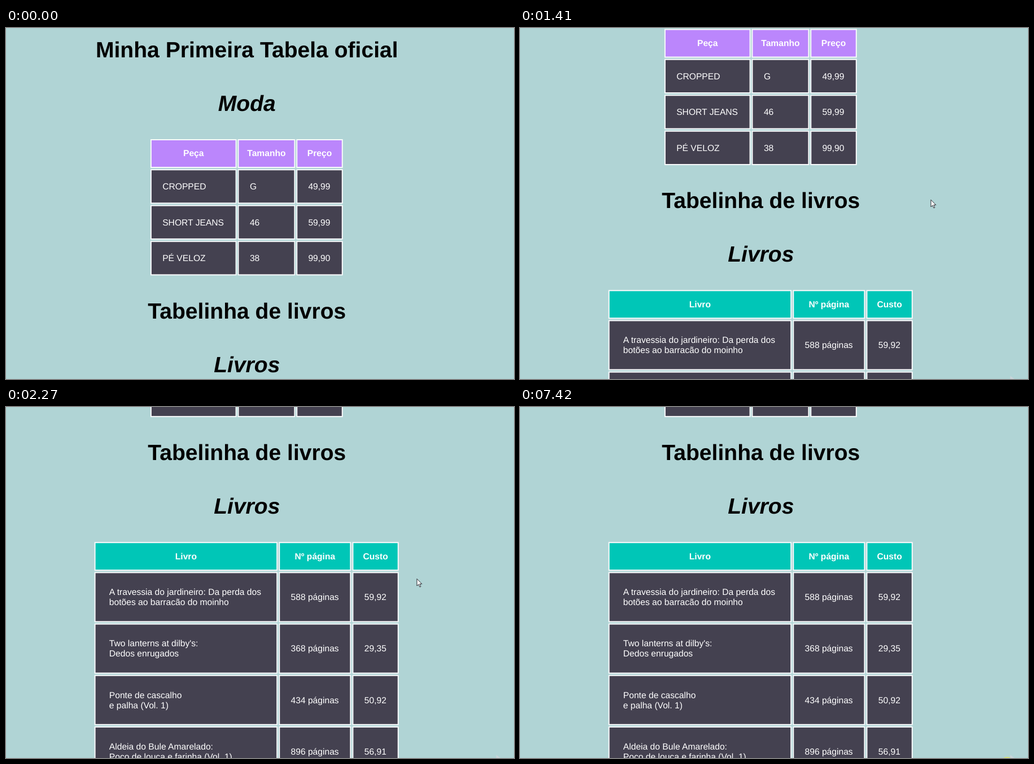
Recreate the animation shown at these times as an HTML page. Size 900x622 px, loop 7540 ms.

```html
<!DOCTYPE html>
<html lang="pt-BR">
<head>
<meta charset="utf-8">
<title>Tabelas</title>
<style>
  html, body { margin: 0; width: 100%; height: 100%; overflow: hidden; background: #b0d4d5; }
  svg { display: block; width: 900px; height: 622px; }
  text { font-family: "Liberation Sans", Arial, sans-serif; font-size: 15.63px; fill: #fff; text-rendering: geometricPrecision; }
  .head { font-weight: bold; text-anchor: middle; }
  .title { font-size: 39.08px; font-weight: bold; text-anchor: middle; fill: #000; }
  .slanted { font-style: italic; }
</style>
</head>
<body>
<svg viewBox="0 0 900 622">
  <rect width="900" height="622" fill="#b0d4d5"/>
  <g id="page"></g>
  <path id="trace" d="M868.5 616.5L876 622H868.5Z" fill="#dcd6de" opacity=".6"/>
  <circle id="glow" cx="863" cy="633" r="13" fill="#e6e65a" opacity=".75"/>
  <path id="pointer" d="M.5 .5V13L3.4 10.3L5.5 15L7.4 14.2L5.4 9.6H9.4Z" fill="#fff" stroke="#15151c" stroke-width=".9" stroke-linejoin="round"/>
</svg>
<script>
const LOOP = 7540;
const DARK = '#444150';
const byId = id => document.getElementById(id);
const page = byId('page');

function add(tag, attrs, content) {
  const el = document.createElementNS('http://www.w3.org/2000/svg', tag);
  for (const key in attrs) el.setAttribute(key, attrs[key]);
  if (content) el.textContent = content;
  page.appendChild(el);
}

const heading = (y, str, extra = '') => add('text', { x: 426.8, y, class: 'title ' + extra }, str);

function cell([left, right], top, height, fill) {
  add('rect', {
    x: left + 1, y: top + 1, width: right - left - 2, height: height - 2,
    fill, stroke: '#f8f9fb', 'stroke-width': 2
  });
}

function table({ top, cols, insets, color, heads, rows, height, pitch }) {
  cols.forEach((col, i) => {
    cell(col, top, 51, color);
    add('text', { x: (col[0] + col[1]) / 2, y: top + 30.4, class: 'head' }, heads[i]);
    rows.forEach((row, r) => {
      const y = top + 53.2 + r * pitch;
      cell(col, y, height, DARK);
      const lines = row[i].split('\n');
      lines.forEach((line, n) => add('text', {
        x: col[0] + insets[i],
        y: y + height / 2 + 5.3 + (n - (lines.length - 1) / 2) * 18
      }, line));
    });
  });
}

heading(52.4, 'Minha Primeira Tabela oficial');
heading(147.1, 'Moda', 'slanted');
table({
  top: 197, height: 61.2, pitch: 63.5, color: '#bb86fc',
  cols: [[255.9, 408.6], [410.5, 512.4], [514.3, 596.8]],
  insets: [21.3, 21.4, 21.1],
  heads: ['Peça', 'Tamanho', 'Preço'],
  rows: [
    ['CROPPED', 'G', '49,99'],
    ['SHORT JEANS', '46', '59,99'],
    ['PÉ VELOZ', '38', '99,90']
  ]
});

heading(514.8, 'Tabelinha de livros');
heading(609.5, 'Livros', 'slanted');
table({
  top: 659.7, height: 89, pitch: 91.2, color: '#00c6b7',
  cols: [[156.6, 481.2], [483.3, 611.4], [613.5, 695.8]],
  insets: [26.2, 21.2, 21.3],
  heads: ['Livro', 'Nº página', 'Custo'],
  rows: [
    ['A travessia do jardineiro: Da perda dos\nbotões ao barracão do moinho', '588 páginas', '59,92'],
    ["Two lanterns at dilby's:\nDedos enrugados", '368 páginas', '29,35'],
    ['Ponte de cascalho\ne palha (Vol. 1)', '434 páginas', '50,92'],
    ['Aldeia do Bule Amarelado:\nPoço de louça e farinha (Vol. 1)', '896 páginas', '56,91']
  ]
});

// [start time, scroll offset]
const scrolls = [[0, 0], [1140, 97.7], [1410, 195.4], [1670, 293.1], [2200, 390.8], [2270, 420.5]];

// [start time, x, y]; no position means hidden
const moves = [
  [0], [70, 869, 612], [130, 876, 588], [190],
  ...sweep(),
  [3960, 735, 303], [4030],
  [6080, 895, 534], [6140, 830, 588], [6210]
];

// Decelerating glide to the left, then a short hook up to the resting place
function sweep() {
  return Array.from({ length: 8 }, (_, i) => {
    const time = 390 + Math.round(i * 550 / 7);
    if (i < 5) {
      const k = 1 - (1 - i / 4) ** 2;
      return [time, 828 - 115 * k, 342 - 14 * k];
    }
    const k = (i - 4) / 3;
    return [time, 713 + 14.5 * k, 328 - 24 * k];
  });
}

const current = (steps, t) => steps.filter(s => s[0] <= t).pop();
const show = (el, on) => el.setAttribute('visibility', on ? 'visible' : 'hidden');

const pointer = byId('pointer'), glow = byId('glow'), trace = byId('trace');

function draw(t) {
  page.setAttribute('transform', `translate(0 ${-current(scrolls, t)[1]})`);
  const [, x, y] = current(moves, t);
  show(pointer, x !== undefined);
  if (x !== undefined) pointer.setAttribute('transform', `translate(${x} ${y})`);
  show(trace, t >= 130);
  show(glow, t >= 7420);
}

const start = performance.now();
function tick() {
  draw((performance.now() - start) % LOOP);
  requestAnimationFrame(tick);
}
tick();
</script>
</body>
</html>
```
